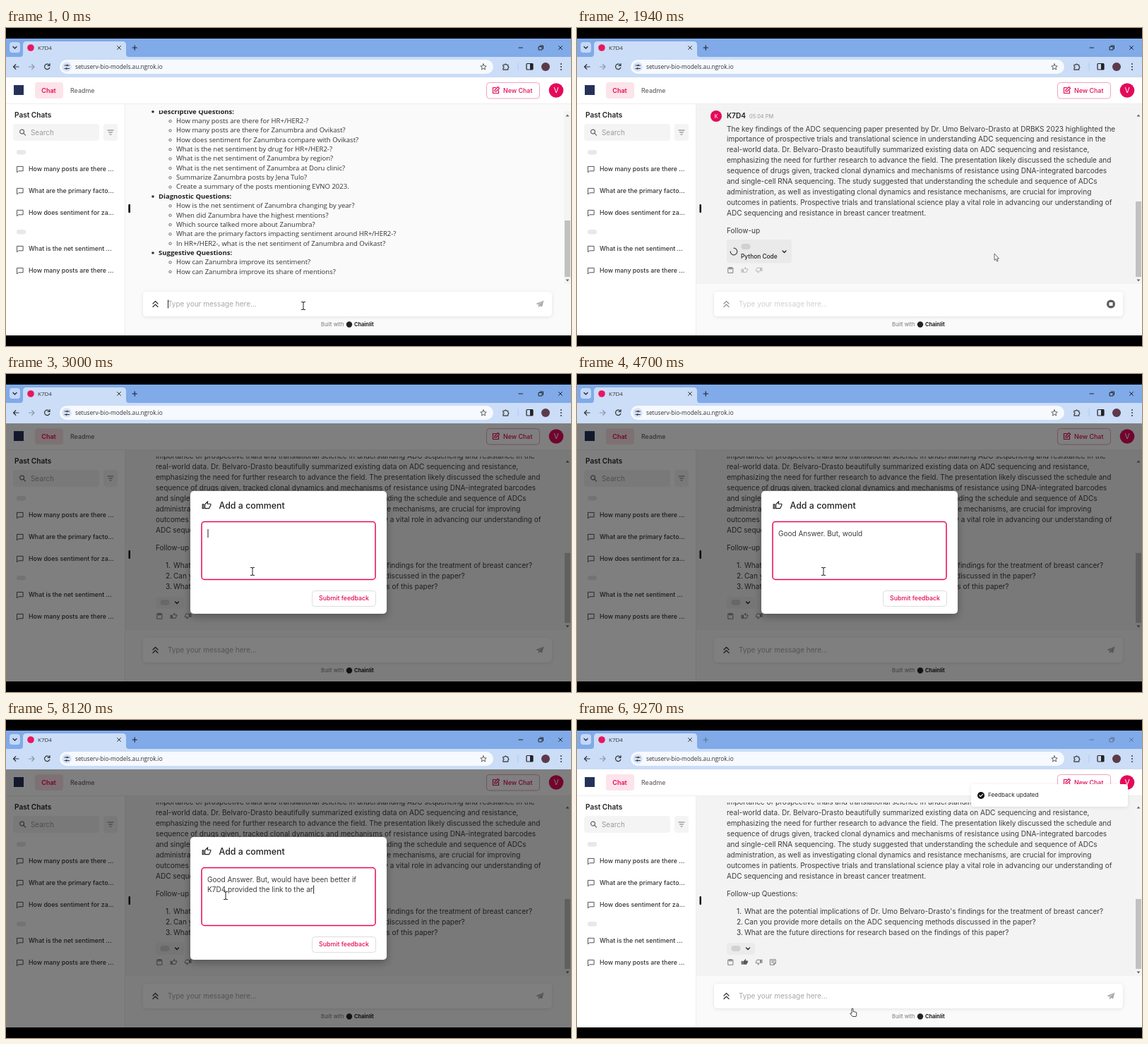
An HTML page for the animation above (9300 ms loop, 800 px wide and 451 px high).

```html
<!DOCTYPE html>
<html lang="en">
<head>
<meta charset="utf-8">
<title>Chat feedback</title>
<style>
  html, body { margin: 0; height: 100%; overflow: hidden; background: #000; }
  svg { display: block; width: 100%; height: 100%; font-family: Inter, sans-serif; }
  text { white-space: pre; }
  use { fill: none; }
  .web { font-family: "Open Sans", "Noto Sans", sans-serif; }
  .line { fill: none; stroke: currentColor; stroke-linecap: round; stroke-linejoin: round; }
  #thumb { fill: inherit; }
</style>
</head>
<body>
<svg id="stage" viewBox="0 0 800 451"></svg>
<script>
const LOOP = 9300, PINK = '#e5095a', BODY = 10.02;
const stage = document.getElementById('stage');
const $ = id => document.getElementById(id);

// Markup helpers; text is placed by the middle of its line.
const text = (x, y, str, size = BODY, fill = '#3c3c3c', extra = '') =>
  `<text x="${x}" y="${(y + size * .355).toFixed(2)}" font-size="${size}" fill="${fill}" ${extra}>${str}</text>`;
const rect = (x, y, w, h, fill, r = 0, extra = '') =>
  `<rect x="${x}" y="${y}" width="${w}" height="${h}" rx="${r}" fill="${fill}" ${extra}/>`;
const dot = (x, y, r, fill) => `<circle cx="${x}" cy="${y}" r="${r}" fill="${fill}"/>`;
const line = (d, color = '#444', width = 1, extra = '') =>
  `<path class="line" d="${d}" color="${color}" stroke-width="${width}" ${extra}/>`;
const icon = (id, x, y, size, color = '#666', extra = '') =>
  `<use href="#${id}" transform="translate(${x - size / 2} ${y - size / 2}) scale(${size / 24})" color="${color}" ${extra}/>`;
const BOLD = 'font-weight="600"', MEDIUM = 'font-weight="500"', MIDDLE = 'text-anchor="middle"';

const speaker = 'Dr. Umo Belvaro-Drasto';
const question = `What are the key findings of the ADC sequencing paper presented by ${speaker}?`;
const welcome = [
  '*Descriptive Questions:',
  'How many posts are there for HR+/HER2-?',
  'How many posts are there for Zanumbra and Ovikast?',
  'How does sentiment for Zanumbra compare with Ovikast?',
  'What is the net sentiment by drug for HR+/HER2-?',
  'What is the net sentiment of Zanumbra by region?',
  'What is the net sentiment of Zanumbra at Doru clinic?',
  'Summarize Zanumbra posts by Jena Tulo?',
  'Create a summary of the posts mentioning EVNO 2023.',
  '*Diagnostic Questions:',
  'How is the net sentiment of Zanumbra changing by year?',
  'When did Zanumbra have the highest mentions?',
  'Which source talked more about Zanumbra?',
  'What are the primary factors impacting sentiment around HR+/HER2-?',
  'In HR+/HER2-, what is the net sentiment of Zanumbra and Ovikast?',
  '*Suggestive Questions:',
  'How can Zanumbra improve its sentiment?',
  'How can Zanumbra improve its share of mentions?'
];
const paragraph = [
  `The key findings of the ADC sequencing paper presented by ${speaker} at DRBKS 2023 highlighted the`,
  'importance of prospective trials and translational science in understanding ADC sequencing and resistance in the',
  'real-world data. Dr. Belvaro-Drasto beautifully summarized existing data on ADC sequencing and resistance,',
  'emphasizing the need for further research to advance the field. The presentation likely discussed the schedule and',
  'sequence of drugs given, tracked clonal dynamics and mechanisms of resistance using DNA-integrated barcodes',
  'and single-cell RNA sequencing. The study suggested that understanding the schedule and sequence of ADCs',
  'administration, as well as investigating clonal dynamics and resistance mechanisms, are crucial for improving',
  'outcomes in patients. Prospective trials and translational science play a vital role in advancing our understanding of',
  'ADC sequencing and resistance in breast cancer treatment.'
];
const followUps = [
  `What are the potential implications of ${speaker}'s findings for the treatment of breast cancer?`,
  'Can you provide more details on the ADC sequencing methods discussed in the paper?',
  'What are the future directions for research based on the findings of this paper?'
];
// Answer lines with offsets from the message header.
const answer = [
  ...paragraph.map((s, i) => ({ s, x: 212, y: 18 + i * 14.9 })),
  { s: 'Follow-up Questions:', x: 212, y: 162 },
  ...followUps.map((s, i) => ({ s, x: 237, y: 187 + i * 15, num: i + 1 }))
];
const paragraphLength = paragraph.join('').length;
const answerLength = answer.reduce((n, l) => n + l.s.length, 0);
const comment = 'Good Answer. But, would have been better if\nK7D4 provided the link to the article.';

const defs = `<defs>
  <clipPath id="view"><rect x="169" y="117" width="621" height="246"/></clipPath>
  <filter id="soft" x="-20%" y="-20%" width="140%" height="160%"><feDropShadow dx="0" dy="4" stdDeviation="6" flood-opacity=".3"/></filter>
  <filter id="faint" x="-10%" y="-30%" width="120%" height="180%"><feDropShadow dx="0" dy="1" stdDeviation="2.5" flood-opacity=".1"/></filter>
  <g id="thumb" class="line" stroke-width="2"><path d="M8 20h10l4-8V9h-8l1-6-7 7zM2 10h3v10H2z"/></g>
  <g id="clip" class="line" stroke-width="2"><path d="M4 4h16v17H4zM8 3h8v5H8z"/></g>
  <g id="note" class="line" stroke-width="2"><path d="M3 3h18v12l-6 6H3zM7 8h10M7 13h6M15 21v-6h6"/></g>
  <g id="bubble" class="line" stroke-width="2"><path d="M3 3h18v14H7l-4 4z"/></g>
  <g id="send"><path fill="currentColor" d="M23 2 1 11l6 3zM23 2 8 15v7l4-5 6 3z"/></g>
  <g id="edit" class="line" stroke-width="2.4"><path d="M12 4H4v16h16v-8M9 15v-4l9-9 4 4-9 9z"/></g>
  <g id="lens" class="line" stroke-width="2.6"><circle cx="10" cy="10" r="6.5"/><path d="m15 15 6 6"/></g>
  <g id="star" class="line" stroke-width="2"><path d="m12 2 3 7 7 .6-5.5 4.8 1.7 7.2-6.2-4-6.2 4 1.7-7.2L2 9.6 9 9z"/></g>
  <g id="puzzle" class="line" stroke-width="2.4"><path d="M3 6h5a2.5 2.5 0 0 1 5 0h5v5a2.5 2.5 0 0 1 0 5v5H3v-5a2.5 2.5 0 0 0 0-5z"/></g>
</defs>`;

const browser = rect(0, 15, 800, 27, '#80aae8') + rect(0, 41, 800, 29, '#cbddf7') +
  '<path d="M20 41q4 0 4-4V24q0-5 5-5h136q5 0 5 5v13q0 4 4 4z" fill="#cbddf7"/>' +
  rect(5, 20, 15, 15, '#c3d7f8', 4) + line('M10 26.5l2.5 2.5 2.5-2.5', '#222', 1.2) +
  dot(35, 28, 4.8, '#e8165f') + text(45, 28.5, 'K7D4', 8, '#333', 'class="web"') +
  line('M157.5 25.5l5 5m0-5l-5 5', '#333') +
  `<g id="controls">${line('M179 28h6.5m-3.25-3.25v6.5', '#222', 1.1) +
    line('M726 28h5.5M754.5 26.5h4.5v4.5h-4.5zM756 25h4.5v4.5M782.5 25.5l5 5m0-5l-5 5', '#222')}</g>` +
  line('M18 55h-7.5m3.25-3.25L10.5 55l3.25 3.25', '#333', 1.2) +
  line('M32.5 55H40m-3.25-3.25L40 55l-3.25 3.25', '#8b97aa', 1.2) +
  line('M61.5 53a3.7 3.7 0 1 0 .3 3M62 50.5V53.5h-3', '#333', 1.2) +
  rect(76, 45, 614, 20, '#f6f9fe', 10) + dot(86, 55, 6.8, '#d5e3f9') +
  line('M83 53h2m3 0h1.5M83 57.5h1m3 0h2.5', '#333') + line('M86.5 53h.1M85.5 57.5h.1', '#333', 2.4) +
  text(98, 55, 'setuserv-bio-models.au.ngrok.io', 8.25, '#333', 'class="web"') +
  icon('star', 676, 55, 10, '#444') + icon('puzzle', 708, 55, 11, '#333') +
  line('M725 50v10', '#b0caf3') + rect(737, 50.5, 9, 8.5, 'none', 1, 'stroke="#222" stroke-width="1.2"') +
  rect(742, 50.5, 4, 8.5, '#222') + dot(764, 55, 6, '#5d3a4a') +
  [51, 55, 59].map(y => dot(786, y, 1, '#333')).join('');

const header = rect(0, 70, 800, 38, '#fff') + rect(0, 107, 800, 1, '#eee') +
  rect(11, 81, 14, 14, '#26315a') + rect(41, 77, 40, 23, '#fde3ea', 4) +
  text(60.5, 88.5, 'Chat', 9, PINK, `${BOLD} ${MIDDLE}`) + text(91, 88.5, 'Readme', 8.85, '#666', MEDIUM) +
  rect(680.5, 77.5, 75, 22.5, '#fff', 4, 'stroke="#f1a2bd"') + icon('edit', 693.5, 88.5, 12, PINK) +
  text(704, 88.5, 'New Chat', 8.9, PINK, MEDIUM) + dot(779, 88.5, 10.3, PINK) +
  text(779, 88.7, 'V', 10.5, '#fff', MIDDLE);

const past = [[200, 'How many posts are there ...'], [231, 'What are the primary facto...'],
  [262, 'How does sentiment for za...'], [313, 'What is the net sentiment ...'], [344, 'How many posts are there ...']];
const sidebar = rect(0, 108, 169, 328, '#fff') + rect(168, 108, 1, 328, '#eee') +
  text(12, 123, 'Past Chats', 10.1, '#222', BOLD) +
  rect(10, 136, 122, 24, '#f4f4f4', 4) + icon('lens', 23.5, 148, 11) + text(35, 148, 'Search', 9.9, '#9a9a9a') +
  rect(138, 136, 20, 24, '#f4f4f4', 4) + line('M144 145h8M145.5 148h5M147 151h2', '#777') +
  [173, 286].map(y => rect(15, y, 13, 6.5, '#e8e8e8', 3)).join('') +
  past.map(([y, s]) => icon('bubble', 20, y + .5, 11, '#444') + text(32, y, s, 8.82, '#333', MEDIUM)).join('');

const welcomeList = welcome.map((s, i) => {
  const y = 118.3 + i * 13.35;
  return s[0] === '*'
    ? dot(208, y + .5, 1.8, '#333') + text(216, y, s.slice(1), 9.54, '#222', 'class="web" font-weight="700"')
    : `<circle cx="232.5" cy="${y + .5}" r="1.7" fill="none" stroke="#444" stroke-width=".8"/>` +
      text(241, y, s, 9.54, '#333', 'class="web"');
}).join('');

const message = (y, letter, name) => dot(197, y, 8, PINK) + text(197, y, letter, 7.5, '#fff', MIDDLE) +
  text(212, y - .5, name, 10.1, '#222', BOLD) + text(244, y, '05:04 PM', 7.4, '#999');
const chat = `<g id="chat">
  ${rect(169, -17, 621, 420, '#f3f3f3')}
  ${message(-62, 'V', 'User')}${text(212, -44, question)}
  ${message(0, 'K', 'K7D4')}
  ${answer.map((l, i) => text(226, l.y, l.num ? l.num + '.' : '', BODY, '#333', `id="num${i}"`) +
    text(l.x, l.y, '', BODY, '#3c3c3c', `id="line${i}"`)).join('')}</g>`;
const actions = `<g id="actions">
  <g id="running">${rect(212, 300, 92, 33.5, '#eaeaea', 4) + rect(232.5, 306, 13, 8, '#d1d1d1', 4)}
    ${text(232, 324, 'Python Code', 8.35, '#222', MEDIUM) + line('M291 316l2.5 2.5 2.5-2.5', '#222', 1.3)}
    <circle id="spinner" class="line" cx="222" cy="317" r="4.8" color="#444" stroke-width="1.2" pathLength="1"/></g>
  <g id="done">${rect(212, 316, 40, 17, '#ebebeb', 4) + rect(218.5, 320, 13, 8, '#d1d1d1', 4)}
    ${line('M239.5 323l2.5 2.5 2.5-2.5', '#222', 1.3)}</g>
  ${icon('clip', 217.5, 343.5, 10)}
  <g id="votes">${icon('thumb', 237.5, 343, 10, '#666', 'id="like"')}
    <g transform="rotate(180 257.5 343.5)">${icon('thumb', 257.5, 343.5, 10)}</g></g>
  ${icon('note', 277.5, 343.5, 10, '#666', 'id="noted"')}</g>`;

const composer = rect(194, 374, 579, 35, '#fff', 5, 'filter="url(#faint)"') +
  line('M208 391l3.5-3.5 3.5 3.5M208 395.5l3.5-3.5 3.5 3.5', '#333', 1.2, 'id="up"') +
  text(229, 391.5, '', BODY, '#aaa', 'id="prompt"') + rect(229, 385.5, 1, 12, '#222', 0, 'id="caret"') +
  icon('send', 756, 391.5, 12, '#aaa', 'id="sendIcon"') +
  `<g id="stop">${dot(756, 391.5, 6, '#5c5c5c') + rect(753.5, 389, 5, 5, '#fff')}</g>` +
  text(446, 420.5, 'Built with', 7.5, '#777') + dot(486, 420.5, 4.2, '#222') +
  text(493, 420.5, 'Chainlit', 7.4, '#222', 'font-weight="700"');

const scrollbar = rect(790, 118, 10, 245, '#f4f4f4') + rect(791, 273, 8, 80, '#c1c1c1', 0, 'id="bar"') +
  '<path d="M792.5 125.5h5l-2.5-3zM792.5 356.5h5l-2.5 3z" fill="#666"/>';

const dialog = `<g id="dialog">${rect(0, 70, 800, 366, '#000', 0, 'opacity=".5"')}
  ${rect(261, 166, 278, 174, '#fff', 5, 'filter="url(#soft)"')}
  ${icon('thumb', 284, 186, 14, '#222') + text(301.5, 186.5, 'Add a comment', 12.4, '#222', MEDIUM)}
  ${rect(277, 209.5, 246, 82, '#fff', 4, `stroke="${PINK}" stroke-width="1.5"`)}
  ${text(285, 226, '', BODY, '#3c3c3c', 'id="typed0"') + text(285, 240.5, '', BODY, '#3c3c3c', 'id="typed1"')}
  ${rect(285, 220, 1, 12, '#222', 0, 'id="typeCaret"')}
  ${rect(433.5, 307.5, 90, 22, '#fff', 4, 'stroke="#ddd"')}
  ${text(478.5, 318, 'Submit feedback', 8.75, PINK, `${MEDIUM} ${MIDDLE}`)}</g>`;
const toast = `<g id="toast">${rect(558, 91, 222, 32, '#fff', 4, 'filter="url(#faint)"') + dot(572, 107, 5, '#111')}
  ${line('M569.8 107l1.6 1.7 3-3.3', '#fff', 1.1) + text(582, 106.5, 'Feedback updated', 8.15, '#222')}</g>`;

const pointers = `
  <g id="beam"><path class="line" color="#222" d="M-2.5-5.5h1.5q1 0 1 1v9q0 1-1 1h-1.5M2.5-5.5H1q-1 0-1 1M0 4.5q0 1 1 1h1.5"/></g>
  <g id="arrow"><path d="M0 0v9.5l2.2-2 1.5 3.5 1.5-.7L3.7 7H6.5z" fill="#fff" stroke="#444" stroke-width=".8"/></g>
  <g id="hand"><path d="M-1-3.5q1-1.2 2 0v4l4 .8q1.2.4 1 1.7l-.8 4.5h-5l-3.5-4q.3-1.5 2.3-.2z" fill="#fff" stroke="#333" stroke-width=".9"/></g>`;

stage.innerHTML = defs + browser + rect(0, 70, 800, 366, '#fafafa') + header + sidebar +
  rect(169, 108, 631, 255, '#f3f3f3', 0, 'id="shade"') +
  rect(173.5, 250, 2.5, 12, '#111', 1) +
  `<g clip-path="url(#view)"><g id="welcome">${welcomeList}</g>${chat}</g>` +
  rect(173.5, 250, 2.5, 12, '#111', 1) +
  actions + scrollbar + composer + dialog + toast + pointers;

const show = (id, on) => $(id).setAttribute('visibility', on ? 'visible' : 'hidden');
const set = (id, name, value) => $(id).setAttribute(name, value);
const clamp = v => Math.max(0, Math.min(1, v));
const smooth = v => v * v * (3 - 2 * v);

// Value of keyframes [time, value, ...] at t.
function track(keys, t, ease = v => v, col = 1) {
  const i = keys.findIndex(k => k[0] > t);
  if (i < 0) return keys[keys.length - 1][col];
  if (i === 0) return keys[0][col];
  const a = keys[i - 1], b = keys[i];
  return a[col] + (b[col] - a[col]) * ease((t - a[0]) / (b[0] - a[0]));
}

const mouse = [[0, 421, 394], [120, 421, 394], [340, 756, 392], [620, 756, 392], [1150, 591, 320],
  [1960, 591, 320], [2580, 243, 350], [2690, 238, 343], [2780, 238, 343], [3000, 349, 280], [5900, 349, 280],
  [6300, 311, 249], [8460, 311, 249], [8650, 478, 319], [8760, 478, 319], [9200, 390, 413]];
const shapes = [[230, 'beam'], [700, 'hand'], [2640, 'arrow'], [2860, 'hand'], [8520, 'beam'], [LOOP, 'hand']];
const streaming = [[620, 0], [1940, paragraphLength + 9], [2440, answerLength]];
const typing = [[3300, 0], [4180, 11], [4700, 23], [5090, 28], [5450, 37], [5610, 38], [5730, 43], [5880, 43],
  [6790, 49], [6850, 49], [8120, 76], [8480, comment.length]];

function drawAnswer(t, started, finished) {
  let left = Math.floor(track(streaming, t)), last = 0;
  answer.forEach((l, i) => {
    $('line' + i).textContent = l.s.slice(0, Math.max(0, left));
    show('num' + i, started && left > 0);
    if (left > 0) last = l.y;
    left -= l.s.length;
  });
  const top = (finished ? 301 : 287) - last;
  set('chat', 'transform', `translate(0 ${top})`);
  show('shade', started && top < 134);
  const content = 353 + last - (finished ? 14 : 0);
  const bar = started ? 245 * 225 / content : t < 360 ? 80 : 91;
  set('bar', 'y', 353 - bar);
  set('bar', 'height', bar);
}

function drawComposer(t, busy, blink) {
  const pasted = t >= 60 && t < 360, prompt = $('prompt');
  prompt.textContent = pasted ? question : 'Type your message here...';
  set('prompt', 'fill', pasted ? '#333' : busy ? '#d0d0d0' : '#a8a8a8');
  set('up', 'color', busy ? '#909090' : '#333');
  set('caret', 'x', pasted ? 229.5 + prompt.getComputedTextLength() : 229);
  show('caret', t < 360 && blink);
  show('sendIcon', !busy);
  show('stop', busy);
}

function drawDialog(t, blink) {
  const open = smooth(clamp((t - 2720) / 225)) * (1 - smooth(clamp((t - 8730) / 195)));
  set('dialog', 'opacity', open);
  const rows = comment.slice(0, Math.floor(track(typing, t))).split('\n');
  [0, 1].forEach(i => $('typed' + i).textContent = rows[i] || '');
  const row = rows.length - 1;
  set('typeCaret', 'x', 285.5 + (rows[row] ? $('typed' + row).getComputedTextLength() : 0));
  set('typeCaret', 'y', 220 + row * 14.5);
  set('typeCaret', 'opacity', blink ? 1 : 0);
}

function draw(t) {
  const started = t >= 580, finished = t >= 2660, blink = (t + 220) % 1000 < 500;
  show('welcome', !started);
  show('chat', started);
  show('actions', started);
  show('running', started && !finished);
  show('done', finished);
  drawAnswer(t, started, finished);
  drawComposer(t, t >= 360 && !finished, blink);
  drawDialog(t, blink);

  const turn = (t - 1940) / 640;
  set('spinner', 'stroke-dasharray', `${.48 + .27 * Math.cos(Math.PI * turn)} 2`);
  set('spinner', 'transform', `rotate(${270 + 270 * turn} 222 317)`);

  const liked = t >= 8790;
  set('votes', 'opacity', finished ? 1 : .5);
  $('like').style.fill = liked ? '#555' : 'none';
  show('noted', liked);
  const drop = 1 - Math.pow(1 - clamp((t - 8850) / 350), 3);
  set('toast', 'opacity', drop);
  set('toast', 'transform', `translate(0 ${-32 * (1 - drop)})`);
  // The window loses focus at the very end.
  set('controls', 'opacity', t < 9200 ? 1 : .4);

  const shape = shapes.find(s => t < s[0])[1];
  const x = track(mouse, t, smooth), y = track(mouse, t, smooth, 2);
  ['beam', 'arrow', 'hand'].forEach(id => show(id, id === shape));
  set(shape, 'transform', `translate(${x} ${y})`);
}

const start = performance.now();
function frame() {
  draw((performance.now() - start) % LOOP);
  requestAnimationFrame(frame);
}
draw(0);
requestAnimationFrame(frame);
</script>
</body>
</html>
```
